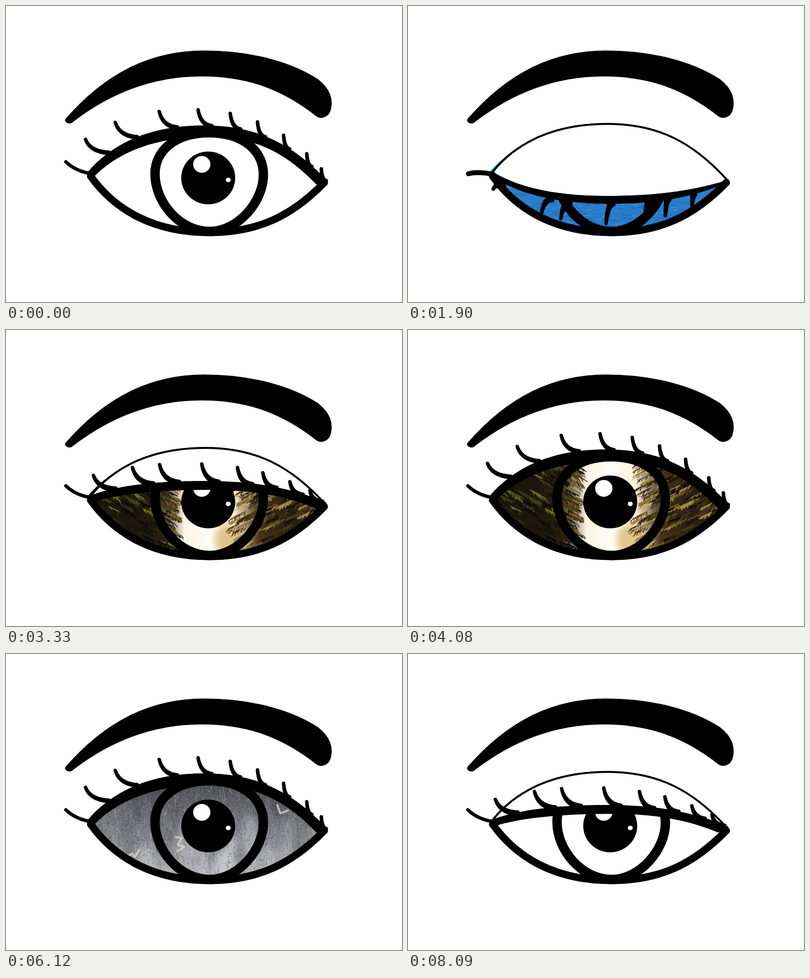
Write an HTML page that moves like this. It is 800 px wide and 600 px high and loops after 8.16 s.

```html
<!DOCTYPE html>
<html lang="en">
<head>
<meta charset="utf-8">
<title>Blinking eye</title>
<style>
  html, body { margin: 0; width: 100%; height: 100%; overflow: hidden; background: #fff; }
  svg { display: block; width: 800px; height: 600px; }
</style>
</head>
<body>
<svg id="stage" viewBox="0 0 800 600" xmlns="http://www.w3.org/2000/svg"></svg>
<script>
const LOOP = 8160, BLINK = 680, OPEN = 330, STEP = 70;
const POSES = ['half', 'low', 'shut', 'low', 'half'];
const LOOKS = ['white', 'galaxy', 'galaxy', 'ocean', 'ocean', 'forest',
               'forest', 'flat', 'grey', 'grey', 'grey', 'flat'];

let seed = 7;
const rnd = () => (seed = (seed * 16807) % 2147483647) / 2147483647;
const between = (a, b) => a + (b - a) * rnd();
const pick = list => list[Math.floor(rnd() * list.length)];
const r1 = v => Math.round(v * 10) / 10;
const repeat = (n, make) => Array.from({ length: n }, (_, i) => make(i)).join('');

const fill = (d, c) => `<path d="${d}" fill="${c}"/>`;
const line = (d, c, w, o = 1) =>
  `<path d="${d}" fill="none" stroke="${c}" stroke-width="${w}" stroke-opacity="${o}" stroke-linecap="round" stroke-linejoin="round"/>`;
const blob = (x, y, rx, ry, c, o = 1) =>
  `<ellipse cx="${r1(x)}" cy="${r1(y)}" rx="${r1(rx)}" ry="${r1(ry)}" fill="${c}" fill-opacity="${o}"/>`;
const rect = c => `<rect x="160" y="235" width="500" height="240" fill="${c}"/>`;
const soft = s => `<g filter="url(#soft)">${s}</g>`;
const grad = (id, dir, ...stops) => `<linearGradient id="${id}" x1="0" y1="0" ${dir}>` +
  stops.map((c, i) => `<stop offset="${i / (stops.length - 1)}" stop-color="${c}"/>`).join('') + '</linearGradient>';

// Two Bezier segments from corner to corner through the middle of a lid
function arch(x0, y0, mx, my, x1, y1) {
  const l = mx - x0, r = x1 - mx;
  return [[x0, y0], [x0 + .21 * l, y0 + .62 * (my - y0)], [x0 + .54 * l, my], [mx, my],
          [x1 - .57 * r, my], [x1 - .28 * r, y1 + .66 * (my - y1)], [x1, y1]];
}
const curve = p => `${p[0]}C${p.slice(1).join(' ')}`;
const band = (top, bottom) => `M${curve(top)}L${curve([...bottom].reverse())}Z`;

function heightAt(p, x) {
  const q = x < p[3][0] ? p.slice(0, 4) : p.slice(3);
  const at = (t, k) => (1 - t) ** 3 * q[0][k] + 3 * t * (1 - t) ** 2 * q[1][k] + 3 * t * t * (1 - t) * q[2][k] + t ** 3 * q[3][k];
  let t = 0;
  while (t < 1 && at(t, 0) < x) t += .01;
  return at(t, 1);
}

// Tapered lash from its root to a bent tip
function lash(x, y, dx, dy, w) {
  const len = Math.hypot(dx, dy), nx = dy / len * w, ny = -dx / len * w;
  const [tx, ty, cx, cy] = [x + dx, y + dy, x + dx * .8, y + dy * .08];
  return 'M' + [tx, ty].map(r1) + 'Q' + [cx, cy, x, y].map(r1) + 'L' + [x + nx, y + ny].map(r1) +
    'Q' + [cx + nx / 2, cy + ny / 2, tx, ty].map(r1) + 'Z';
}

const lower = arch(171, 345, 411, 459, 643, 358);
const crease = arch(172, 335, 403, 239, 645, 353);
const openTop = arch(164, 338, 400, 242, 649, 354);
const lowRoots = [190, 285, 322, 408, 482, 521, 573];
const halfRoots = [222, 298, 350, 430, 498, 547, 600, 640];

// lean and len: [value, swing] of a lash across the eye; dir: up -1, down 1
const raised = 'M121 316Q140 334 168 339', level = 'M122 340Q140 335 172 341';
const lids = {
  open: { top: openTop, bottom: arch(178, 346, 410, 265, 627, 362), corner: raised,
    roots: [208, 265, 346, 416, 474, 524, 573, 618, 647], lean: [29, 19], len: [24, 8], dir: -1, base: 3 },
  half: { top: arch(166, 337, 400, 306, 648, 350), bottom: arch(178, 348, 410, 324, 627, 362), corner: raised,
    roots: halfRoots, lean: [36, 10], len: [21, 14], dir: -1, base: 6 },
  low: { top: arch(168, 334, 400, 385, 648, 352), bottom: arch(172, 347, 410, 401, 645, 358), corner: level,
    roots: lowRoots, lean: [8, 10], len: [8, 32], dir: 1, base: 8 },
  shut: { top: arch(168, 336, 411, 447, 647, 350), bottom: lower, corner: level,
    roots: halfRoots, lean: [4, 24], len: [24, 30], dir: 1, base: 8 }
};

function pose(name) {
  const p = lids[name], edge = p.dir < 0 ? p.top : p.bottom;
  const cover = name === 'open' ? '' : fill(band(crease, p.top), '#fff') + line('M' + curve(crease), '#000', 4);
  const hairs = p.roots.map(x => {
    const a = Math.PI * (x - 168) / 480;
    return lash(x, heightAt(edge, x), -p.lean[0] - p.lean[1] * Math.cos(a), p.dir * (p.len[0] + p.len[1] * Math.sin(a)), p.base);
  }).join('');
  return `<g id="${name}">${cover}${fill(band(p.top, p.bottom), '#000')}${line('M' + curve(lower), '#000', 15)}
    ${line(p.corner, '#000', p.dir < 0 ? 7 : 10)}<path d="${hairs}" stroke="#000" stroke-width="7" stroke-linejoin="round"/></g>`;
}

// Short strokes scattered over the eye, leaning along (dx, dy)
function strokes(n, c, w, dx, dy, o) {
  return line(repeat(n, () => {
    const k = between(.5, 1.5);
    return `M${r1(between(160, 650))} ${r1(between(245, 465))}q${r1(dx * k / 2)} ${r1(dy * k * rnd())} ${r1(dx * k)} ${r1(dy * k)}`;
  }), c, w, o);
}

// Clumps of drooping needles; dir is the side the branches grow to
function foliage(n, x0, x1, dir, colors) {
  return repeat(n, () => {
    const x = between(x0, x1), y = between(260, 450);
    const twig = repeat(9, i => `M${r1(x + dir * i * 2.5)} ${r1(y + i * 1.2)}l${r1(dir * between(1, 8))} ${r1(between(3, 9))}`);
    return line(twig, pick(colors), r1(between(1, 2.4)));
  });
}

const ring = 'M410 257C340 257 301 295 301 340C301 397 350 457 412 457C468 457 520 397 520 342C520 294 480 257 410 257Z';
const brow = `M121 229C200 138 290 91 400 91C500 91 580 116 630 149C655 168 660 190 656 208
  C653 224 637 231 626 222C560 170 490 142 395 142C290 142 205 180 133 236C126 240 117 234 121 229Z`;
const spark = (x, y) => line(`M${x - 9} ${y}h18M${x} ${y - 9}v18`, '#cfe2ff', 1.2) + blob(x, y, 4, 4, '#fff');

const looks = {
  white: () => rect('#fff'),
  flat: () => rect('#ff7433') + fill(ring, '#0586a6'),
  galaxy: () => rect('url(#space)') +
    soft(repeat(30, i => blob(175 + i * 16, between(270, 450), between(12, 28), between(8, 18),
      pick(['#7d2d9c', '#3a2567', '#a2434c', '#a83c86', '#4c2779', '#8a5fd0']), .8)) +
      blob(274, 394, 18, 14, '#7284d8') + blob(552, 410, 28, 16, '#b3a4fa')) +
    repeat(170, () => {
      const r = .5 + 1.5 * rnd() ** 3;
      return blob(between(165, 645), between(250, 455), r, r, pick(['#f3dcff', '#f3dcff', '#ffc9a0']), .9);
    }) + spark(274, 394) + spark(553, 410) +
    `<g clip-path="url(#iris)">${rect('#e3dccf')}${soft(blob(410, 445, 95, 22, '#94948f'))}` +
    line(repeat(4, i => `M320 ${310 + i * 22}q90 60 190 0`), '#8d8a84', 6) +
    line(repeat(30, i => `M${280 + i * 10} 250q38 50 4 100q-4 60 -44 68q-14 24 -22 44`), '#cf6a22', 2.4) + '</g>',
  ocean: () => rect('url(#sea)') + strokes(420, '#1c62ae', 1.6, 14, 2, .75) +
    strokes(320, '#4ba4e2', 1.3, 11, -2, .75) + strokes(70, '#8cc9f0', 1, 6, 1, .6),
  forest: () => rect('url(#wood)') + soft(blob(448, 425, 26, 32, '#e0c68c')) +
    foliage(150, 165, 335, 1, ['#0c0a06', '#15130a', '#262611', '#3f4419', '#6a702c']) +
    foliage(60, 300, 335, 1, ['#15100a', '#2b200f', '#4d3d1a', '#80672f']) +
    foliage(170, 485, 640, -1, ['#171008', '#2c2210', '#473a18', '#6b5a26', '#a08a45']) +
    foliage(45, 468, 500, -1, ['#3a2810', '#6e4f24', '#a17b40', '#c9a869']),
  grey: () => rect('url(#wall)') +
    soft(repeat(26, i => {
      const up = rnd() < .5;
      return blob(170 + i * 19, up ? between(270, 340) : between(370, 440), between(6, 14), between(25, 55),
        up ? '#484a50' : pick(['#d6d6db', '#6a6c72', '#c2c2c8']), .6);
    })) +
    strokes(320, '#26282c', 2, 0, 16, .16) + strokes(300, '#e8e8ec', 2, 0, 14, .14) +
    strokes(1300, '#17181b', 1.1, .6, 1.5, .5) + strokes(1100, '#f0f0f2', 1.1, .6, 1.5, .4) +
    line('M243 410l12 -5l5 6l10 -14M343 371l12 2l-8 14l13 4l-14 9M548 306l6 17l16 -6', '#ddd5bf', 4, .8)
};

const stage = document.getElementById('stage');
stage.innerHTML = `<defs>
  <clipPath id="eye"><path d="${band(openTop, lower)}"/></clipPath>
  <clipPath id="iris"><path d="${ring}"/></clipPath>
  <filter id="soft" x="-20%" y="-20%" width="140%" height="140%"><feGaussianBlur stdDeviation="7"/></filter>
  ${grad('space', 'x2="1" y2="0"', '#5b2780', '#51285f', '#7c3652', '#5c2863', '#8b3d92', '#6d2f8d')}
  ${grad('sea', 'x2="0" y2="1"', '#3f97d8', '#2b80cb', '#2679c4')}
  ${grad('wood', 'x2="1" y2="0"', '#14120a', '#191609', '#1d180c', '#2a2010', '#fff4e2', '#fffdf8', '#fff1da', '#4a3517', '#2c2210', '#241c0c', '#241c0c')}
  ${grad('wall', 'x2="0" y2="1"', '#3a3c41', '#6a6c72', '#909197', '#c8c8cd')}
  </defs>
  <rect width="800" height="600" fill="#fff"/>${fill(brow, '#000')}${line(brow, '#000', 1.5)}
  <g clip-path="url(#eye)">${Object.keys(looks).map(k => `<g id="${k}">${looks[k]()}</g>`).join('')}</g>
  ${line(ring, '#000', 19)}${blob(408.5, 348.5, 54.5, 53.5, '#000')}
  ${blob(395.5, 321, 17.5, 17, '#fff')}${blob(449, 352.5, 5, 4.5, '#fff')}
  ${Object.keys(lids).map(pose).join('')}`;

function show(names, active) {
  for (const n of names) document.getElementById(n).style.display = n === active ? '' : 'none';
}

let last = '';
function draw(time) {
  const t = time % LOOP, cycle = Math.floor(t / BLINK), local = t - cycle * BLINK;
  const step = Math.floor((local - OPEN) / STEP);
  const lid = step < 0 ? 'open' : POSES[Math.min(step, 4)];
  const look = LOOKS[(cycle + (step >= 2 ? 1 : 0)) % LOOKS.length];
  if (lid + look === last) return;
  last = lid + look;
  show(Object.keys(lids), lid);
  show(Object.keys(looks), look);
}

const start = performance.now();
function tick() {
  draw(performance.now() - start);
  requestAnimationFrame(tick);
}
tick();
</script>
</body>
</html>
```
